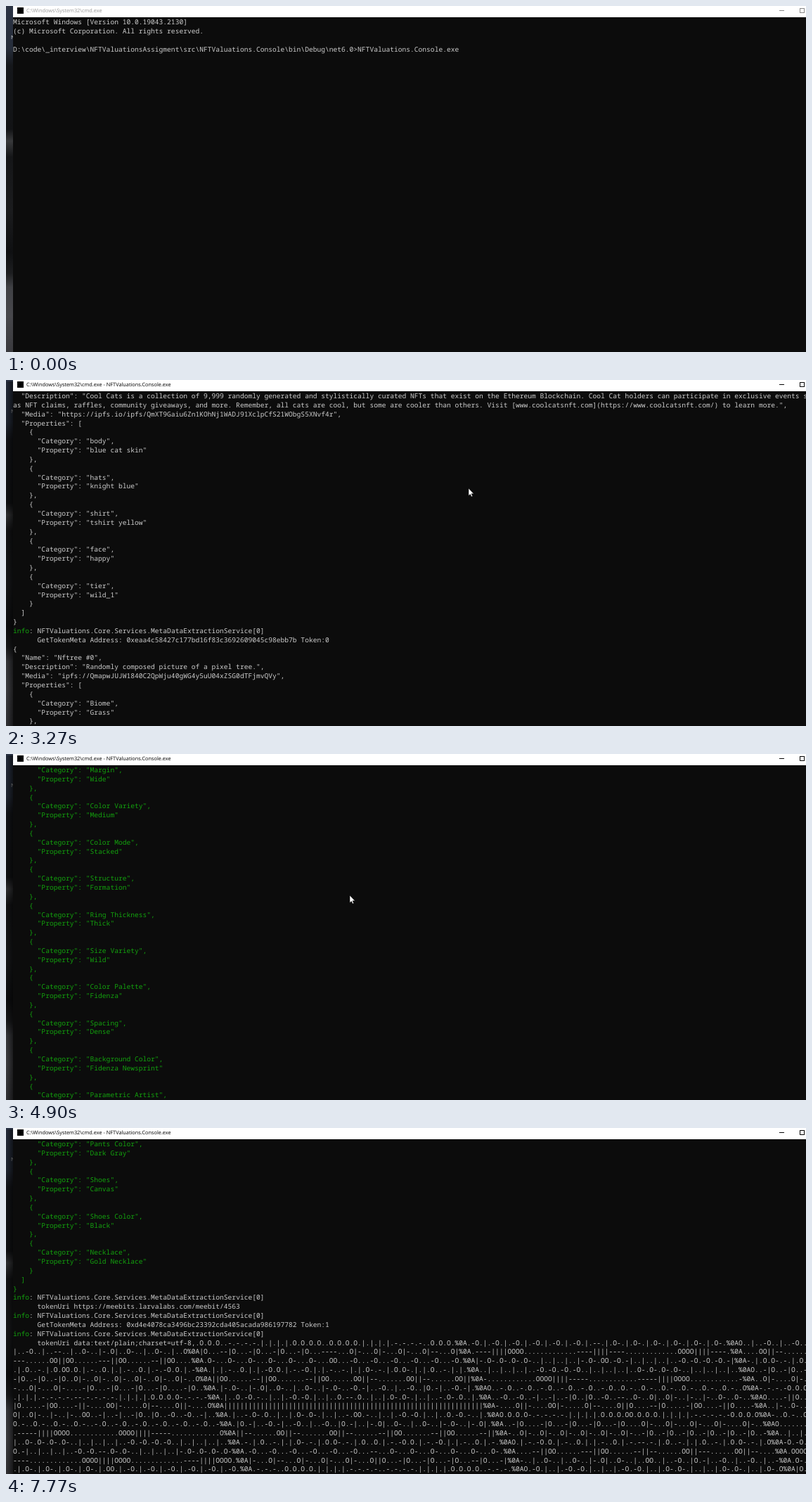
An HTML page for the animation above (8000 ms loop, 1138x492 px).

```html
<!DOCTYPE html>
<html lang="en">
<head>
<meta charset="utf-8">
<title>Console run</title>
<style>
  html, body { margin: 0; width: 100%; height: 100%; overflow: hidden; background: #0c0c0c; }
  #stage { position: relative; width: 1138px; height: 492px; overflow: hidden; }
  #stage > * { position: absolute; }
  #desk {
    left: 0; top: 0; width: 10px; height: 492px; overflow: hidden;
    background: linear-gradient(#2b3344 0, #262d3a 60px, #15171b 85px, #121315 175px, #38393b 192px,
      #151618 215px, #1b1c1e 290px, #0f1012 350px, #1d1e20 380px, #404145 400px, #48484c 440px, #3a3a3e 492px);
  }
  #desk b { position: absolute; left: 7px; top: 38px; font: 8px "Open Sans", sans-serif; color: #ddd; }
  #shade { left: 0; top: 2px; width: 10px; height: 490px; background: linear-gradient(90deg, #0002, #0009); }
  #bar { left: 10px; top: 0; width: 1128px; height: 16px; background: #fff; }
  #icon { left: 16px; top: 2px; width: 9px; height: 9px; background: #000; }
  #title {
    left: 29px; top: 1px; white-space: pre; color: #000;
    font: 7.35px/12px "Open Sans", sans-serif; text-rendering: geometricPrecision;
  }
  #min { left: 1100px; top: 6px; width: 7px; height: 1px; background: #000; }
  #max { left: 1129px; top: 3px; width: 5px; height: 5px; border: 1px solid #000; }
  .idle #title { color: #999; }
  .idle #min { background: #888; }
  .idle #max { border-color: #888; }
  .idle #shade { opacity: 0; }
  #out {
    left: 10px; top: 17px; width: 1128px; height: 475px; margin: 0; overflow: hidden; color: #ccc;
    font: 9.625px/12.836px "Noto Sans Mono", monospace; font-variant-ligatures: none;
    text-rendering: geometricPrecision;
  }
  #out i { font-style: normal; color: #13a10e; }
  #caret { width: 6px; height: 3px; background: #ccc; }
  #mouse { left: 0; top: 0; overflow: visible; }
</style>
</head>
<body>
<div id="stage" class="idle">
  <div id="desk"><b>N</b></div>
  <div id="shade"></div>
  <div id="bar"></div>
  <div id="icon"></div>
  <div id="title"></div>
  <div id="min"></div>
  <div id="max"></div>
  <pre id="out"></pre>
  <div id="caret"></div>
  <svg id="mouse" width="9" height="14">
    <path d="M0 0V10.6L2.4 8.4L4 12L5.7 11.3L4.1 7.8H7.4Z" fill="#fff" stroke="#000" stroke-width=".5"/>
  </svg>
</div>
<script>
const LOOP = 8000, COLS = 200, ROWS = 37, ROW_H = 12.836;
const $ = id => document.getElementById(id);
const stage = $('stage'), out = $('out'), title = $('title'), caret = $('caret'), mouse = $('mouse');

// ---- log text ----
// Seeded letters and digits between a given head and tail
function fill(head, tail, len, base) {
  let seed = [...head].reduce((s, c) => (s * 31 + c.charCodeAt(0)) % 65536, 7);
  const rnd = () => (seed = (seed * 16807 + 11) % 2147483647) / 2147483647;
  let s = head;
  while (s.length < len - tail.length) {
    const c = Math.floor(rnd() * base).toString(base);
    s += base > 16 && rnd() < 0.5 ? c.toUpperCase() : c;
  }
  return s + tail;
}
const cid = (head, tail) => fill(head, tail, 46, 36);
const addr = (head, tail) => '0x' + fill(head, tail, 40, 16);

const info = msg => ['info: NFTValuations.Core.Services.MetaDataExtractionService[0]', '      ' + msg];
const meta = (address, id) => info(`GetTokenMeta Address: ${address} Token:${id}`);
const uri = (scheme, path) => info(`tokenUri ${scheme}:${path}`);

// pairs: "category=property" entries separated by "|"
function token(name, desc, media, pairs) {
  const head = ['{', `  "Name": "${name}",`, `  "Description": "${desc}",`, `  "Media": "${media}",`];
  if (!pairs) return [...head, '  "Properties": []', '}'];
  const list = pairs.split('|');
  const body = list.flatMap((pair, k) => {
    const [cat, prop] = pair.split('=');
    return ['    {', `      "Category": "${cat}",`, `      "Property": "${prop}"`,
      k < list.length - 1 ? '    },' : '    }'];
  });
  return [...head, '  "Properties": [', ...body, '  ]', '}'];
}

// Mirrored 64-column text art, one row per "%0A"
function glyph(rows) {
  let s = '';
  for (let i = 0; i < rows; i++) {
    for (let j = 0; j < 64; j++) {
      const p = Math.abs(j - 31.5) * (0.52 - 0.12 * i) + 0.42;
      s += '.O|-..'[Math.floor(6 * (p - Math.floor(p)))];
    }
    s += '%0A';
  }
  return s;
}

const tree = 'Randomly composed picture of a pixel tree.';
const treeAddr = addr('eaa4c58427c1', '5c98ebb7b');
const treeMedia = 'ipfs://' + cid('QmapwJUJW184', 'TFjmvQVy');
const plotAddr = addr('1b829b926a14', '0c09d02b2');
const plotCid = cid('QmdEN6d2T6Dg', 'L7WJnsp2b');
const log = [
  'Microsoft Windows [Version 10.0.19043.2130]',
  '(c) Microsoft Corporation. All rights reserved.',
  '',
  'D:\\code\\_interview\\NFTValuationsAssigment\\src\\NFTValuations.Console\\bin\\Debug\\net6.0>NFTValuations.Console.exe',
  ...meta(addr('1a92f7381b9f', '96471050c'), 0),
  ...uri('https', '//api.coolcatsnft.com/cat/0'),
  ...token('Cool Cat #0',
    'Cool Cats is a collection of 9,999 randomly generated and stylistically curated NFTs that exist on the ' +
    'Ethereum Blockchain. Cool Cat holders can participate in exclusive events such as NFT claims, raffles, ' +
    'community giveaways, and more. Remember, all cats are cool, but some are cooler than others. ' +
    'Visit [www.coolcatsnft.com](https://www.coolcatsnft.com/) to learn more.',
    'https://ipfs.io/ipfs/' + cid('QmXT9Gaiu6Zn', 'gS5XNvf4r'),
    'body=blue cat skin|hats=knight blue|shirt=tshirt yellow|face=happy|tier=wild_1'),
  ...meta(treeAddr, 0),
  ...token('Nftree #0', tree, treeMedia,
    'Biome=Grass|Leaves=Momo Maple|Fruit=None|Number of fruit=0|Ground cover=grass|Background=day'),
  ...meta(treeAddr, 1),
  ...token('Nftree #1', tree, treeMedia, 'Background=BlueSky|Biome=Grass|Leaves=Green'),
  ...meta(plotAddr, 2000000),
  ...uri('https', '//api.artblocks.io/token/2000000'),
  ...token('Fidenza #0',
    'A versatile flow field program that draws curves of many widths and colors, each placed so that no ' +
    'shape ever overlaps another one.',
    `https://ipfs.io/ipfs/${plotCid}/images/2000000.png`,
    'Scale=Large|Margin=Wide|Color Variety=Medium|Color Mode=Stacked|Structure=Formation|' +
    'Ring Thickness=Thick|Size Variety=Wild|Color Palette=Fidenza|Spacing=Dense|' +
    'Background Color=Fidenza Newsprint|Parametric Artist=Fidenza'),
  ...uri('https', '//api.artblocks.io/token/2000000'),
  ...meta(plotAddr, 1000001),
  ...token("Founders' Private Plot #1", 'This is a Founding Plot', 'ipfs://' + plotCid),
  ...uri('https', `//ipfs.moralis.io:2053/ipfs/${cid('QmdyK44Q6PrG', 'cpNSUhg7w')}/1000001`),
  ...meta(addr('892848074dde', 'e55580ca85'), 0),
  ...token('Asherah',
    'The light.  The source.  The originator of all.  Asherah was the first CyberBroker and all that came ' +
    'after her began their existence starting with her genetic algorithms.  She is the reason TPL exists.',
    `https://ipfs.moralis.io:2053/ipfs/${cid('QmcsrQJMKA9q', 'JLJGpkHxk')}/0.svg`,
    'Talent=Source|Species=Source|Class=Founders|Mind=30|Body=30'),
  ...uri('https', '//ipfs.moralis.io:2053/ipfs/0'),
  ...meta(addr('7bd29408f11d', 'bb716bc7'), 4563),
  ...token('Meebit #4563', 'Meebit #4563',
    'http://meebits.app/meebitimages/characterimage?index=4563&type=full&imageType=jpg',
    'Type=Human|Hair Style=Big Bangs|Hair Color=Brown|Shirt=Tee|Shirt Color=Black|Pants=Trackpants|' +
    'Pants Color=Dark Gray|Shoes=Canvas|Shoes Color=Black|Necklace=Gold Necklace'),
  ...uri('https', '//meebits.larvalabs.com/meebit/4563'),
  ...meta(addr('d4e4078ca349', 'a986197782'), 1),
  ...uri('data', 'text/plain;charset=utf-8,' + glyph(46)),
].flatMap(s => s.match(new RegExp(`.{1,${COLS}}`, 'g')) || ['']);

// Stretches printed in green: first line, first column there, line after the last
const GREEN = [[80, 0, 90], [99, 0, 145], [163, 8, 187], [201, 0, 238]];
const esc = s => s.replace(/&/g, '&amp;').replace(/</g, '&lt;');
const tint = (s, a, b) => esc(s.slice(0, a)) + '<i>' + esc(s.slice(a, b)) + '</i>' + esc(s.slice(b));
const lines = log.map((s, n) => {
  if (s.startsWith('info:')) return tint(s, 0, 4);
  const g = GREEN.find(([from, , to]) => n >= from && n < to);
  return g ? tint(s, n === g[0] ? g[1] : 0, COLS) : esc(s);
});

// ---- timeline ----
const TOP = [[0, 0], [2970, 5], [3270, 10], [3490, 30], [3560, 49], [3770, 70], [4060, 88], [4200, 97],
  [4620, 100], [4900, 104], [5180, 125], [5460, 146], [6040, 170], [6180, 193], [6610, 221]];
const SHOWN = [[0, 4], [2260, 6], [2690, 36], [2760, 999]];
const CARET = [[0, null], [1330, [110, 3]], [1830, null], [1980, [0, 4]], [2260, [0, 6]], [2690, null]];
const MOVES = [
  { at: 250, steps: 5, from: [1107, 474], to: [658, 154] },
  { at: 4060, steps: 6, from: [658, 154], to: [489, 201] },
  { at: 5180, steps: 7, from: [489, 201], to: [636, 271] },
  { at: 6040, steps: 5, from: [636, 271], to: [428.5, 283] },
  { at: 7410, steps: 6, from: [428.5, 283], to: [550, 500], via: [395, 345] },
];
const at = (keys, t) => keys.filter(k => k[0] <= t).pop()[1];

function pointer(t) {
  const m = MOVES.filter(v => v.at <= t).pop();
  if (!m) return null;
  const p = Math.min(1, (Math.floor((t - m.at) / 70) + 1) / m.steps), q = 1 - p;
  return m.from.map((a, k) => {
    const b = m.to[k], c = m.via ? m.via[k] : (a + b) / 2;
    return q * q * a + 2 * p * q * c + p * p * b;
  });
}

let last = '';
function draw(t) {
  const top = at(TOP, t), end = Math.min(top + ROWS, at(SHOWN, t));
  if (last !== top + ':' + end) {
    out.innerHTML = lines.slice(top, end).join('\n');
    last = top + ':' + end;
  }
  stage.className = t < 830 ? 'idle' : '';
  title.textContent = 'C:\\Windows\\System32\\cmd.exe' + (t < 1980 ? '' : ' - NFTValuations.Console.exe');

  const cell = at(CARET, t);
  caret.style.display = cell ? 'block' : 'none';
  if (cell) {
    caret.style.left = Math.round(10.4 + cell[0] * 5.775) + 'px';
    caret.style.top = Math.round(13.8 + (cell[1] + 1) * ROW_H) + 'px';
  }

  const pos = pointer(t);
  mouse.style.display = pos ? 'block' : 'none';
  if (pos) mouse.style.transform = `translate(${pos[0]}px, ${pos[1]}px)`;
}

const start = performance.now();
function tick() {
  draw((performance.now() - start) % LOOP);
  requestAnimationFrame(tick);
}
tick();
</script>
</body>
</html>
```
